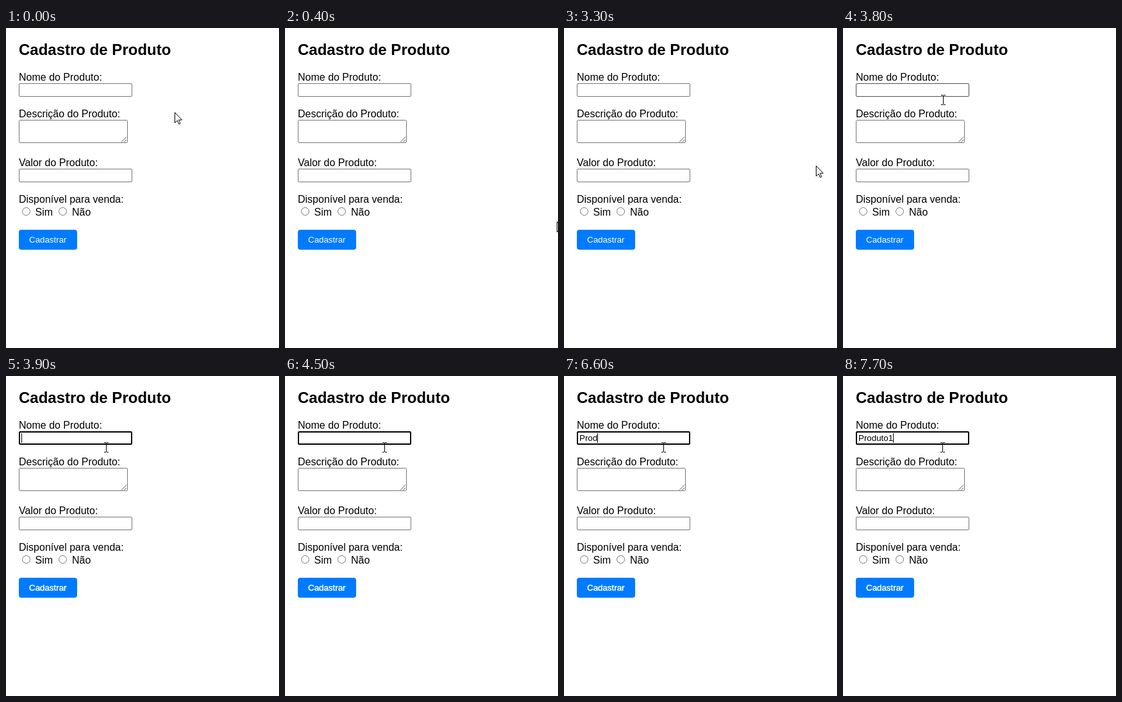
An HTML page for the animation above (8 s loop, 426 px wide and 498 px high).

```html
<!DOCTYPE html>
<html lang="pt">
<head>
<meta charset="utf-8">
<title>Cadastro</title>
<style>
  html, body { margin: 0; height: 100%; overflow: hidden; background: #fff; }
  body { font: 16px/18px "Liberation Sans", Arial, sans-serif; }
  svg, p { position: absolute; left: 0; top: 0; margin: 0; white-space: pre; }
  p { left: 20px; }
  .title { font-size: 24px; line-height: 28px; font-weight: bold; }
  .small { font-size: 13.333px; line-height: 15px; }
  .box { fill: #fff; stroke: #767676; }
</style>
</head>
<body>
<svg width="426" height="498">
  <rect id="field" class="box" x="20.5" y="86.5" width="176" height="20" rx="1.5"/>
  <rect id="ring" x="21" y="87" width="175" height="19" rx="1.5" fill="none" stroke="#000" stroke-width="2"/>
  <rect class="box" x="20.5" y="143.5" width="169" height="35" rx="1"/>
  <path d="M180 177.5L188 169.5M184.5 177.5L188 174" stroke="#555" fill="none"/>
  <rect class="box" x="20.5" y="219.5" width="176" height="20" rx="1.5"/>
  <circle class="box" cx="31.5" cy="285.5" r="6"/>
  <circle class="box" cx="88.5" cy="285.5" r="6"/>
  <rect x="20" y="314" width="91" height="31" rx="4" fill="#007bff"/>
</svg>

<p class="title" style="top:20px">Cadastro de Produto</p>
<p style="top:68px">Nome do Produto:</p>
<p class="small" id="typed" style="left:24px; top:89px"></p>
<p style="top:125px">Descrição do Produto:</p>
<p style="top:201px">Valor do Produto:</p>
<p style="top:258px">Disponível para venda:</p>
<p style="left:45.5px; top:278px">Sim</p>
<p style="left:103px; top:278px">Não</p>
<p class="small" id="label" style="left:36px; top:322px; color:#fff">Cadastrar</p>

<svg width="426" height="498">
  <rect id="caret" y="89" width="1" height="15"/>
  <path id="arrow" d="M.5 .5V16.5L4.3 13L6.8 18.6L9 17.6L6.6 12.1H11.5Z" fill="#fff" stroke="#000"/>
  <path id="beam" d="M-3 -7.5H0M1 -7.5H4M.5 -7V7M-3 7.5H0M1 7.5H4" fill="none" stroke="#000"/>
</svg>
<script>
const LOOP = 8000, WORD = "Produto1";
const $ = id => document.getElementById(id);
const show = (el, on) => el.setAttribute("visibility", on ? "visible" : "hidden");

// [time, pointer, x, y]
const moves = [
  [0, "arrow", 263, 131], [100, "arrow", 292, 160], [200, "arrow", 345, 217],
  [300, "arrow", 398, 273], [400, "arrow", 424, 301], [1800, "", 0, 0],
  [3300, "arrow", 393, 214], [3400, "arrow", 334, 189], [3500, "arrow", 263, 158],
  [3600, "arrow", 205, 133], [3700, "arrow", 171, 119],
  [3800, "beam", 156, 112], [3900, "beam", 156, 111], [4100, "beam", 155, 111]
];
// [time, letters typed, caret visible]
const typing = [
  [0, 0, 0], [3900, 0, 1], [4500, 0, 0], [5000, 1, 1], [5600, 1, 0],
  [6100, 1, 1], [6200, 2, 1], [6300, 3, 1], [6600, 4, 1], [6800, 5, 1],
  [6900, 6, 1], [7000, 7, 1], [7500, 7, 0], [7700, 8, 1]
];
const at = (steps, t) => steps.findLast(s => s[0] <= t);

function draw(t) {
  const [, pointer, x, y] = at(moves, t);
  for (const id of ["arrow", "beam"]) {
    show($(id), id === pointer);
    $(id).setAttribute("transform", `translate(${x} ${y})`);
  }

  const focused = t >= 3900;
  show($("ring"), focused);
  $("field").style.stroke = t >= 3800 ? "#4f4f4f" : "";
  $("label").style.webkitTextStroke = focused ? "0.45px #fff" : "";

  const [, count, caretOn] = at(typing, t);
  $("typed").textContent = WORD.slice(0, count);
  $("caret").setAttribute("x", 24 + $("typed").offsetWidth);
  show($("caret"), caretOn);
}

let start;
function frame(now) {
  start ??= now;
  draw((now - start) % LOOP);
  requestAnimationFrame(frame);
}
draw(0);
requestAnimationFrame(frame);
</script>
</body>
</html>
```
